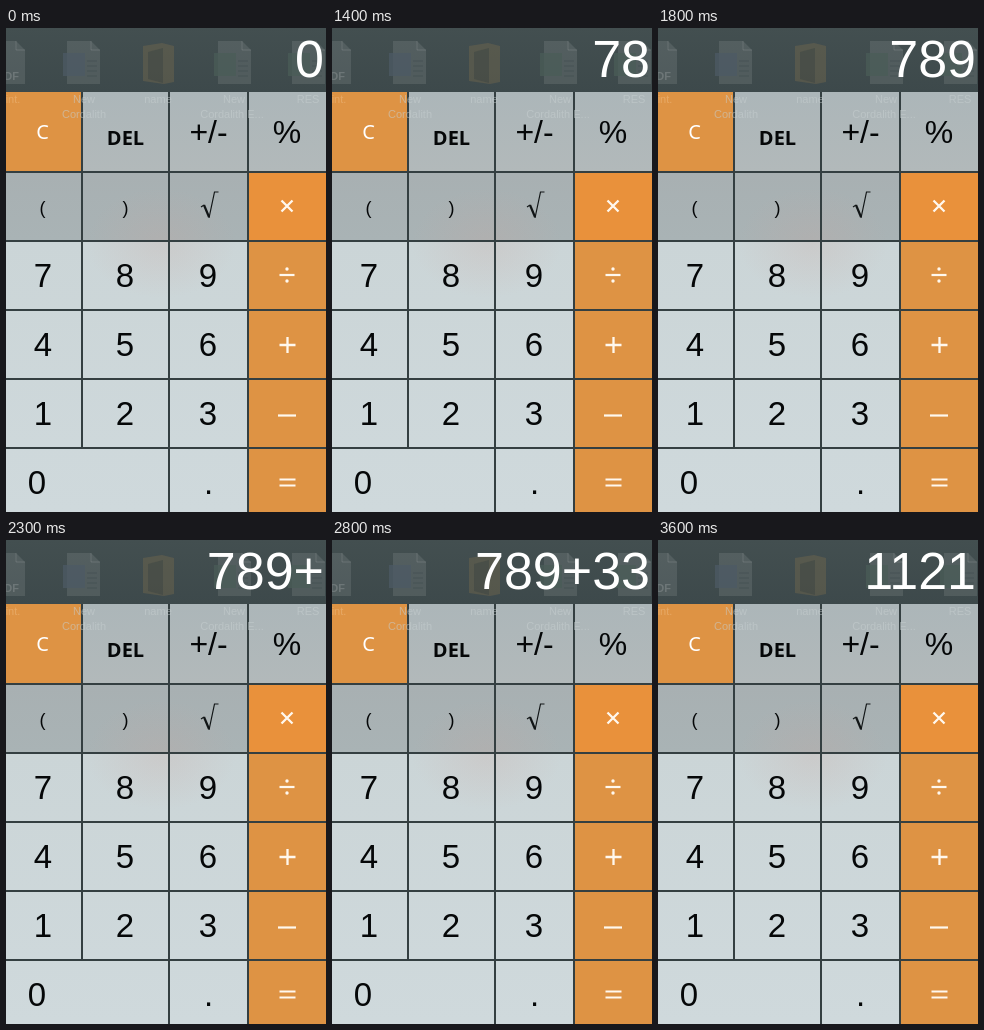
An HTML page for the animation above (5 s loop, 320 by 484 pixels).

```html
<!DOCTYPE html>
<html lang="en">
<head>
<meta charset="utf-8">
<title>Calculator</title>
<style>
  html, body { margin: 0; width: 100%; height: 100%; overflow: hidden; background: #333f41; }
  svg { display: block; width: 100vw; height: 100vh; }
  text { font-family: "Liberation Sans", Arial, sans-serif; }
</style>
</head>
<body>
<svg id="stage" viewBox="0 0 320 484" xmlns="http://www.w3.org/2000/svg">
  <defs>
    <linearGradient id="bar" x1="0" y1="0" x2="0" y2="1">
      <stop offset="0" stop-color="#434f50"/><stop offset="1" stop-color="#3d494b"/>
    </linearGradient>
    <linearGradient id="top" x1="0" y1="0" x2="0" y2="1">
      <stop offset="0" stop-color="#acb6b9"/><stop offset="1" stop-color="#b2b9ba"/>
    </linearGradient>
    <linearGradient id="second" x1="0" y1="0" x2="0" y2="1">
      <stop offset="0" stop-color="#a8b0b2"/><stop offset="1" stop-color="#a9b3b5"/>
    </linearGradient>
    <linearGradient id="keys" x1="0" y1="0" x2="0" y2="1">
      <stop offset="0" stop-color="#cbd5d7"/><stop offset="1" stop-color="#cfd9dc"/>
    </linearGradient>
    <linearGradient id="down" x1="0" y1="0" x2="1" y2="1">
      <stop offset="0" stop-color="#98a3a6"/><stop offset="1" stop-color="#a3acad"/>
    </linearGradient>
    <radialGradient id="glow">
      <stop offset="0" stop-color="#c9a49c" stop-opacity=".22"/>
      <stop offset="1" stop-color="#c9a49c" stop-opacity="0"/>
    </radialGradient>
  </defs>
  <g id="base"></g>
  <g id="desktop"></g>
  <g id="labels"></g>
  <text id="display" x="318" y="49" font-size="52" fill="#fff" text-anchor="end"></text>
</svg>
<script>
const $ = id => document.getElementById(id);
const LOOP = 5000, LINE = "#343f41", ORANGE = "#de9344";
const cols = [0, 77, 164, 243, 322];
const rows = [64, 145, 214, 283, 352, 421, 490];

function add(parent, tag, attrs, text) {
  const el = document.createElementNS("http://www.w3.org/2000/svg", tag);
  for (const k in attrs) el.setAttribute(k, attrs[k]);
  if (text !== undefined) el.textContent = text;
  parent.appendChild(el);
  return el;
}
const rect = (p, x, y, width, height, fill, extra) =>
  add(p, "rect", { x, y, width, height, fill, ...extra });
const label = (p, text, x, y, size, extra) =>
  add(p, "text", { x, y, "font-size": size, "text-anchor": "middle", fill: "#050708", ...extra }, text);
const stroke = (p, d, color, width, extra) =>
  add(p, "path", { d, fill: "none", stroke: color, "stroke-width": width, ...extra });

function drawBase() {
  const g = $("base");
  rect(g, 0, 0, 320, 64, "url(#bar)");
  rect(g, 0, 64, 320, 80, "url(#top)");
  rect(g, 0, 144, 320, 69, "url(#second)");
  rect(g, 0, 213, 320, 271, "url(#keys)");
  add(g, "ellipse", { cx: 155, cy: 215, rx: 75, ry: 55, fill: "url(#glow)" });
  rect(g, 0, 64, 76, 80, ORANGE);
  rect(g, 242, 144, 78, 340, ORANGE);
  rect(g, 242, 144, 78, 69, "#e9913b");
  const lines = rows.slice(1, 6).map(y => `M0 ${y - 1}H320`).join("")
    + "M76 64V420M163 64V484M242 64V484";
  stroke(g, lines, LINE, 2);
}

// Faint desktop items seen through the window
function sheet(g, x, y, w, h, mark) {
  add(g, "path", { d: `M${x} ${y}h${w - 9}l9 9v${h - 9}h${-w}z`, fill: "#aeb4b4", opacity: .17 });
  stroke(g, `M${x + w - 9} ${y}v9h9`, "#b5bbbb", 1, { opacity: .22 });
  if (mark) {
    stroke(g, `M${x + 20} ${y + 20}h10m-10 5h10m-10 5h10m-10 5h10`, "#344346", 1, { opacity: .4 });
    rect(g, x - 4, y + 12, 22, 23, mark, { opacity: .75 });
  }
}
function drawDesktop() {
  const g = $("desktop");
  sheet(g, -16, 13, 35, 43);
  label(g, "PDF", 2, 52, 11, { fill: "#7a8283", opacity: .7, "font-weight": 700 });
  sheet(g, 61, 13, 33, 43, "#4c5a64");
  sheet(g, 212, 13, 33, 43, "#4a5d57");
  sheet(g, 286, 13, 33, 43, "#4a5d57");
  add(g, "path", { d: "M137 18l19-3 12 3v36l-10 2-21-3z", fill: "#75694d", opacity: .42 });
  add(g, "path", { d: "M142 24l15-4v35l-15-4z", fill: "#303d3e", opacity: .35 });
  const words = [["int.", 7, 75], ["New", 78, 75], ["name", 152, 75], ["New", 228, 75],
    ["RES", 302, 75], ["Cordalith", 78, 90], ["Cordalith E...", 226, 90]];
  words.forEach(([s, x, y]) => label(g, s, x, y, 11, {
    fill: x < 60 ? "#efba80" : "#c7cfd0", opacity: .55 }));
}

const pressed = {};
function key(name, col, row, x, y, size, extra) {
  const g = $("labels");
  const shade = add(g, "g", { visibility: "hidden" });
  const l = cols[col], t = rows[row], w = cols[col + 1] - l - 2, h = 67;
  rect(shade, l, t, w, h, col === 3 ? "#b57a3c" : "url(#down)");
  stroke(shade, `M${l + 1.5} ${t + h - 1}V${t + 1.5}H${l + w - 1}`, "#343c3d", 1.6);
  stroke(shade, `M${l + 1} ${t + h - 1}h${w - 1.5}V${t + 1}`, "#d5dbdc", 1);
  const face = add(g, "g", {});
  if (size) label(face, name, x, y, size, extra);
  pressed[name] = { shade, face };
  return face;
}

function drawKeys() {
  const g = $("labels");
  const sans = 'font-family:"Noto Sans","Open Sans",sans-serif';
  label(g, "C", 36.5, 111, 20, { fill: "#fff", style: sans });
  label(g, "DEL", 119.5, 117, 20, { "font-weight": 600, style: sans });
  label(g, "+/-", 202.5, 115, 32);
  label(g, "%", 281, 115, 32);
  label(g, "(", 36.5, 186, 18);
  label(g, ")", 119.5, 186, 18);
  stroke(g, "M195 179l3-2", "#111516", 1.2);
  stroke(g, "M198 177l5 12", "#111516", 2.2);
  stroke(g, "M203 190l5.5-26h4", "#111516", 1.2);

  const mid = [37, 119, 202];
  ["789", "456", "123"].forEach((s, r) => [...s].forEach((c, i) =>
    key(c, i, r + 2, mid[i], 259 + 69 * r, 33)));
  label(g, "0", 31, 466, 33);
  label(g, ".", 202.5, 466, 33);

  const white = "#fff8ee";
  stroke(g, "M275.5 172.5l11 11m0-11l-11 11", white, 2.3);
  stroke(g, "M273.5 247h15", white, 2.2);
  [241, 253].forEach(cy => add(g, "circle", { cx: 281, cy, r: 1.7, fill: white }));
  stroke(key("+", 3, 3), "M273.5 317h16m-8-8v16", white, 2.3);
  stroke(g, "M272 387.5h18", white, 2.2);
  stroke(g, "M273.5 451.5h16m-16 6h16", white, 2.2);
}

// [start ms, display, key held down]
const steps = [
  [0, "0"], [1000, "7"], [1200, "7", "8"], [1300, "78"],
  [1600, "78", "9"], [1700, "789"], [2200, "789", "+"], [2300, "789+"],
  [2600, "789+3"], [2700, "789+3", "3"], [2800, "789+33"],
  [3000, "789+33", "2"], [3100, "789+332"], [3500, "1121"]
];

let last;
function render(t) {
  const step = steps.filter(s => s[0] <= t).pop();
  if (step === last) return;
  last = step;
  $("display").textContent = step[1];
  for (const name in pressed) {
    const on = name === step[2], { shade, face } = pressed[name];
    shade.setAttribute("visibility", on ? "visible" : "hidden");
    face.setAttribute("transform", on ? "translate(1 1)" : "");
  }
}

drawBase();
drawDesktop();
drawKeys();
render(0);
const start = performance.now();
function tick() {
  render((performance.now() - start) % LOOP);
  requestAnimationFrame(tick);
}
requestAnimationFrame(tick);
</script>
</body>
</html>
```
